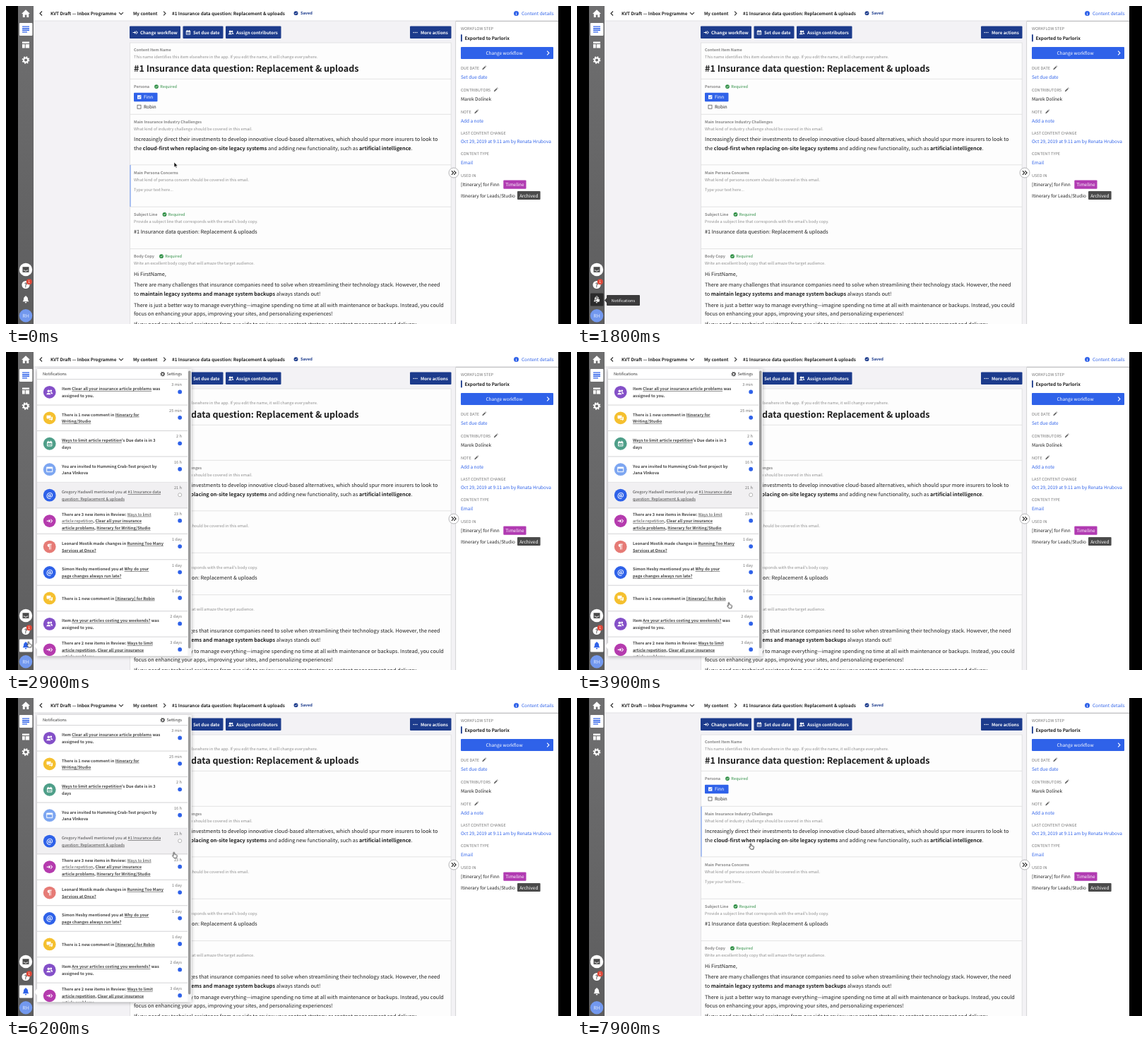
An HTML page that plays this animation: 800x450 px, repeating every 8000 ms.

```html
<!DOCTYPE html>
<html lang="en">
<head>
<meta charset="utf-8">
<title>Content editor notifications</title>
<style>
html, body { margin: 0; width: 100%; height: 100%; overflow: hidden; background: #000; }
svg { display: block; width: 100vw; height: 100vh; }
text {
  font-family: "Noto Sans CJK JP", "Noto Sans CJK SC", "Noto Sans CJK", "Noto Sans", sans-serif;
  white-space: pre; text-rendering: geometricPrecision;
}
.b { font-weight: 700; }
.r { font-weight: 400; }
.u { text-decoration: underline; }
</style>
</head>
<body>
<svg id="stage" viewBox="0 0 800 450"></svg>
<script>
const LOOP = 8000;
const BLUE = '#2f62e9', NAVY = '#1c3b8c', GREY = '#8f8f8f', INK = '#1f1f1f', GREEN = '#2f8f45';
const TITLE = '#1 Insurance data question: Replacement & uploads';

// Marks: *bold*, _bold link_, ~plain link~
const CLASSES = { '*': 'b', '_': 'b u', '~': 'r u' };
const rich = s => s.replace(/&/g, '&amp;').replace(/([*_~])(.*?)\1/g,
  (m, mark, body) => `<tspan class="${CLASSES[mark]}">${body}</tspan>`);
const text = (x, y, s, size, fill = INK, cls = '', anchor = 'start') =>
  `<text x="${x}" y="${y}" font-size="${size}" fill="${fill}" class="${cls}" text-anchor="${anchor}">${rich(s)}</text>`;
const rect = (x, y, w, h, fill, extra = '') =>
  `<rect x="${x}" y="${y}" width="${w}" height="${h}" fill="${fill}" ${extra}/>`;
const circle = (x, y, r, fill, extra = '') => `<circle cx="${x}" cy="${y}" r="${r}" fill="${fill}" ${extra}/>`;
const line = (x1, y1, x2, y2, stroke = '#dcdcde', w = 0.8) =>
  `<path d="M${x1} ${y1}L${x2} ${y2}" stroke="${stroke}" stroke-width="${w}"/>`;
const stroke = (d, w = 1) => `<path d="${d}" fill="none" stroke="currentColor" stroke-width="${w}"/>`;
const fill = d => `<path d="${d}" fill="currentColor"/>`;
const group = (id, body, extra = '') => `<g id="${id}" ${extra}>${body}</g>`;

const ICONS = {
  home: fill('M-6 .3L0-5.5 6 .3H4.2V5.2H1.3V1.6H-1.3V5.2H-4.2V.3Z'),
  lines: fill('M-5-4.6H5V-3.2H-5ZM-5-2H5V-.6H-5ZM-5 .6H5V2H-5ZM-5 3.2H2V4.6H-5Z'),
  layout: fill('M-5-4.5H5V-2H-5ZM-5-1H-1.3V4.5H-5ZM-.3-1H5V4.5H-.3Z'),
  gear: `<circle r="3" fill="none" stroke="currentColor" stroke-width="2"/>
    <circle r="4.4" fill="none" stroke="currentColor" stroke-width="2" stroke-dasharray="1.728"/>`,
  bell: fill('M-4.4 2.8C-2.8 1-3.2 0-2.9-1.7C-2.6-3.5-1.2-4.2-.7-4.4V-5.2H.7V-4.4C1.2-4.2 2.6-3.5 2.9-1.7C3.2 0 2.8 1 4.4 2.8ZM-1.3 3.6H1.3A1.3 1.4 0 0 1-1.3 3.6Z'),
  inbox: fill('M-4.5-3.8H4.5V3.8H-4.5Z') + '<path d="M-3.3 1H-1.5L-.8 2.1H.8L1.5 1H3.3" stroke="#fff" fill="none" stroke-width=".9"/>',
  flow: fill('M-4-.6H-1V-2.6L1.4 0-1 2.6V.6H-4ZM.9-2.6H2L4.4 0 2 2.6H.9L3 0Z'),
  calendar: stroke('M-3.2-2.6H3.2V3.3H-3.2ZM-1.8-4V-2M1.8-4V-2') + fill('M-3.2-2.6H3.2V-.8H-3.2ZM-1.8.4H-.4V1.7H-1.8ZM.5.4H1.9V1.7H.5Z'),
  people: `<circle cx="-1.4" cy="-1.6" r="1.8" fill="currentColor"/><circle cx="2" cy="-1.9" r="1.4" fill="currentColor"/>`
    + fill('M-4.4 3.3C-4.2 0 1.4 0 1.6 3.3ZM2.3 2.5C2.2 1.2 1.7.6 1.2.1C3 -.5 4.4 .7 4.4 2.5Z'),
  chat: fill('M-4.2-3.6H1.8V.6H-1.6L-3 2V.6H-4.2ZM2.6-1.5H4.3V2.7H3.4V4L2 2.7H-.9V1.4H2.6Z'),
  win: stroke('M-4-3.2H4V3.4H-4Z') + fill('M-4-3.2H4V-1.2H-4Z'),
  at: `<text y="3.1" font-size="9.5" fill="currentColor" class="b" text-anchor="middle">@</text>`,
  para: fill('M3-4V-3H2V4H1.1V-3H.2V4H-.7V.5C-4-.1-3.6-4-.6-4Z'),
  pencil: fill('M-3 3L-2.5 1.1 1.1-2.5 2.5-1.1-1.1 2.5ZM1.7-3L2.3-3.5 3.5-2.3 3-1.7Z'),
  check: `<circle r="2.9" fill="currentColor"/><path d="M-1.4 0L-.4 1.1 1.5-1" fill="none" stroke="#fff" stroke-width=".8"/>`,
  left: stroke('M1.5-3L-1.5 0 1.5 3', 1.2),
  right: stroke('M-1.4-2.8L1.4 0-1.4 2.8', 1.1),
  down: stroke('M-3-1.4L0 1.5 3-1.4', 1.1),
  dots: [-2.8, 0, 2.8].map(x => circle(x, 0, 0.9, 'currentColor')).join(''),
};
const icon = (name, x, y, color = '#fff', k = 1) =>
  `<g transform="translate(${x} ${y}) scale(${k})" color="${color}">${ICONS[name]}</g>`;

const railTile = (name, y, back, color) =>
  rect(19, y - 9, 18.4, 18, back, 'rx="1"') + icon(name, 28, y, color);

function rail() {
  return rect(17, 0, 22, 450, 'url(#rail)') + icon('home', 28, 10.8)
    + railTile('lines', 33, '#fff', BLUE) + icon('layout', 28, 55) + icon('gear', 28, 76.5)
    + circle(28, 373, 9.2, '#fff') + icon('inbox', 28, 373, '#4a4a4a')
    + circle(28, 394.5, 5.6, '#fff') + text(28, 397.6, '?', 8.4, '#4a4a4a', 'b', 'middle')
    + circle(32.8, 390.3, 4, '#e0493a') + text(32.8, 392.2, '1', 5.2, '#fff', '', 'middle')
    + icon('bell', 28, 415.5)
    + circle(28, 438.3, 9.2, '#7298ee') + text(28, 441, 'RH', 7, '#dbe6ff', '', 'middle');
}

function topBar() {
  return rect(39, 0, 743, 21, '#fff') + line(39, 21, 782, 21, '#dadadd')
    + icon('left', 49.5, 10.5, '#333') + text(63, 12.9, 'KVT Draft — Inbox Programme', 6.3, INK, 'b')
    + icon('down', 163, 10.5, '#333') + text(180, 12.9, 'My content', 6.3, INK, 'b')
    + icon('right', 224.5, 10.5, '#333') + text(235, 12.9, TITLE, 6.3, INK, 'b')
    + icon('check', 410.5, 10.2, NAVY) + text(417, 12.4, 'Saved', 5.67, NAVY, 'b')
    + circle(722.5, 10.5, 3.5, BLUE) + text(722.5, 12.6, 'i', 5.5, '#fff', 'b', 'middle')
    + text(730, 12.9, 'Content details', 6.45, BLUE);
}

function toolbar() {
  return [
    [175, 72, 'flow', 183, 190, 'Change workflow'],
    [250.5, 57, 'calendar', 258, 265, 'Set due date'],
    [311, 78.5, 'people', 318.5, 326, 'Assign contributors'],
    [572, 58.5, 'dots', 579.5, 587, 'More actions'],
  ].map(([x, w, ic, ix, tx, s]) => rect(x, 28.6, w, 17.4, NAVY, 'rx="1"')
    + icon(ic, ix, 37.5, '#fff', 0.85) + text(tx, 39.9, s, 6.15, '#fff', 'b')).join('');
}

const label = (y, s, hint) => text(181, y, s, 5.5, '#858585', 'b') + (hint ? text(181, y + 9.7, hint, 5.68, GREY) : '');
const required = (x, y) => icon('check', x, y - 2.2, GREEN) + text(x + 5.3, y, 'Required', 5.6, GREEN);
const para = (y, s) => text(181, y, s, 7.28);

function card() {
  return rect(175.4, 52, 454.8, 410, '#fdfdfd', 'stroke="#dcdcde" stroke-width=".8"')
    + [103.3, 153.3, 224.8, 284.2, 343.6].map(y => line(175.4, y, 630.2, y)).join('')
    + label(64.2, 'Content Item Name', 'This name identifies this item elsewhere in the app. If you edit the name, it will change everywhere.')
    + text(181, 93.1, TITLE, 12.55, INK, 'b')
    + label(116.3, 'Persona') + required(213, 116.3)
    + rect(181, 122.8, 33.5, 12.4, BLUE, 'rx="1"')
    + rect(186, 126.2, 5.4, 5.4, '#fff') + `<path d="M187.2 128.9l1.2 1.3 2-2.5" fill="none" stroke="${BLUE}" stroke-width=".8"/>`
    + text(195, 131.4, 'Finn', 6.45, '#fff')
    + rect(186, 140.2, 5, 5, '#fff', 'stroke="#444" stroke-width=".7"') + text(195, 145.3, 'Robin', 6.45)
    + label(166.2, 'Main Insurance Industry Challenges', 'What kind of industry challenge should be covered in this email.')
    + para(191.2, 'Increasingly direct their investments to develop innovative cloud-based alternatives, which should spur more insurers to look to')
    + para(203.7, 'the *cloud-first when replacing on-site legacy systems* and adding new functionality, such as *artificial intelligence*.')
    + label(237.9, 'Main Persona Concerns', 'What kind of persona concern should be covered in this email.')
    + text(181, 261.6, 'Type your text here...', 5.75, GREY)
    + label(297.1, 'Subject Line', "Provide a subject line that corresponds with the email's body copy.") + required(224.5, 297.1)
    + para(322.1, TITLE)
    + label(356.4, 'Body Copy', 'Write an excellent body copy that will amaze the target audience.') + required(220, 356.4)
    + para(381.5, 'Hi FirstName,')
    + para(397.4, 'There are many challenges that insurance companies need to solve when streamlining their technology stack. However, the need')
    + para(409.9, 'to *maintain legacy systems and manage system backups* always stands out!')
    + para(425.6, 'There is just a better way to manage everything—imagine spending no time at all with maintenance or backups. Instead, you could')
    + para(438.1, 'focus on enhancing your apps, improving your sites, and personalizing experiences!')
    + para(453.4, 'If you need any technical assistance from our side to review your content strategy or content management and delivery,');
}

function details() {
  const head = (y, s) => text(644, y, s, 5.64, '#777');
  const val = (y, s, c = BLUE) => text(644, y, s, 6.47, c);
  const tag = (x, y, w, s, c) => rect(x, y - 8.7, w, 12.2, c, 'rx="1"') + text(x + w / 2, y, s, 6.45, '#fff', '', 'middle');
  return rect(637, 21.4, 145, 429, '#fff') + line(636.6, 21.4, 636.6, 450, '#d3d3d6', 1)
    + head(34.2, 'WORKFLOW STEP') + rect(644, 40.3, 1.8, 10, NAVY) + text(649.5, 47.6, 'Exported to Parlorix', 6.45, INK, 'b')
    + rect(644, 58, 131, 17, BLUE, 'rx="1"') + text(705.5, 68.9, 'Change workflow', 6.45, '#fff', '', 'middle') + icon('right', 767.5, 66.5)
    + head(90.1, 'DUE DATE') + icon('pencil', 677, 87.5, '#666', 0.9) + val(103, 'Set due date')
    + head(120.8, 'CONTRIBUTORS') + icon('pencil', 693.5, 118.5, '#666', 0.9) + val(134.4, 'Marek Dolínek', INK)
    + head(152, 'NOTE') + icon('pencil', 666, 149.5, '#666', 0.9) + val(165, 'Add a note')
    + head(181.6, 'LAST CONTENT CHANGE') + val(194.4, 'Oct 29, 2019 at 9:11 am by Renata Hrubova')
    + head(210.5, 'CONTENT TYPE') + val(223.6, 'Email')
    + head(241.5, 'USED IN') + val(255.2, '[Itinerary] for Finn', INK) + tag(704.3, 255.2, 32.2, 'Timeline', '#b13bb2')
    + val(270.6, 'Itinerary for Leads/Studio', INK) + tag(724, 270.6, 32.6, 'Archived', '#4b4b4b')
    + circle(634, 236, 7, '#fff', 'stroke="#a4a4a8" stroke-width=".8"')
    + icon('right', 632.3, 236, '#222') + icon('right', 635.7, 236, '#222');
}

const ROWS = [
  ['people', '#8450c8', '3 min', 'Item _Clear all your insurance article problems_ was', 'assigned to you.'],
  ['chat', '#f5c02f', '25 min', 'There is 1 new comment in _Itinerary for_', '_Writing/Studio_'],
  ['calendar', '#4f9f89', '2 h', "_Ways to limit article repetition_'s Due date is in 3", 'days'],
  ['win', '#7da6f1', '16 h', 'You are invited to Humming Crab-Test project by', 'Jana Vlnkova'],
  ['at', BLUE, '21 h', 'Gregory Hadwell mentioned you at ~#1 Insurance data~', '~question: Replacement & uploads~'],
  ['flow', '#b53bae', '23 h', 'There are 3 new items in Review: ~Ways to limit~', '~article repetition~, _Clear all your insurance_', '_article problems_, _Itinerary for Writing/Studio_'],
  ['para', '#e67b76', '1 day', 'Leonard Mostik made changes in _Running Too Many_', '_Services at Once?_'],
  ['at', BLUE, '1 day', 'Simon Hesby mentioned you at _Why do your_', '_page changes always run late?_'],
  ['chat', '#f5c02f', '1 day', 'There is 1 new comment in _[Itinerary] for Robin_'],
  ['people', '#8450c8', '2 days', 'Item _Are your articles costing you weekends?_ was', 'assigned to you.'],
  ['flow', '#b53bae', '3 days', 'There are 2 new items in Review: _Ways to limit_', '_article repetition_, _Clear all your insurance_', '_article problems_'],
];
const ROW_H = 36.45, READ = 4;

function row([ic, color, when, ...lines], i) {
  const top = 38.6 + i * ROW_H, mid = top + ROW_H / 2, read = i === READ;
  return (read ? rect(44, top, 213, ROW_H, '#f1f0f2') : '')
    + line(44, top + ROW_H, 257, top + ROW_H, '#c8c8cb')
    + circle(61.7, mid, 8.9, color) + icon(ic, 61.7, mid)
    + lines.map((s, n) => text(79, mid + 2.2 + (n - (lines.length - 1) / 2) * 9.6, s, 5.7, '#444', read ? '' : 'b')).join('')
    + text(249, top + 9.8, when, 5.7, '#777', '', 'end')
    + circle(246.2, top + 17.8, read ? 2.5 : 2.9, read ? '#fff' : BLUE, read ? 'stroke="#999" stroke-width=".7"' : '');
}

function panel() {
  return railTile('bell', 415.5, '#fff', BLUE)
    + rect(44, 24, 218.6, 406.3, '#fff', 'style="filter:drop-shadow(0 1px 2.5px rgba(0,0,0,.32))"')
    + '<path d="M44 411.5L39.8 416 44 420.5Z" fill="#fff"/>'
    + `<g clip-path="url(#list)">${ROWS.map(row).join('')}</g>`
    + text(52, 33.4, 'Notifications', 5.68, '#333')
    + icon('gear', 221.8, 31.3, '#444', 0.62) + text(249, 33.4, 'Settings', 5.7, '#333', '', 'end')
    + line(44, 38.6, 257, 38.6, '#c8c8cb')
    + rect(257.2, 24, 5.4, 406.3, '#f4f4f5') + rect(258, 26.5, 3.5, 393, '#9c9c9c', 'rx="1.7"');
}

const arrow = '<path d="M0 0V7.2L1.7 5.7 2.8 8.3 4 7.8 2.9 5.2H5.1Z" fill="#111" stroke="#fff" stroke-width=".6"/>';
const hand = '<path d="M-.8.7C-.8-.3.7-.3.8.7L1 3.2C1.6 2.8 2.1 2.9 2.3 3.4C2.9 3.1 3.4 3.3 3.5 3.9C4.2 3.7 4.5 4.1 4.4 4.9L3.8 8.1H.2L-2.2 5.2C-2.5 4.4-1.6 4.1-.8 4.9Z" fill="#fff" stroke="#222" stroke-width=".8"/>';

const stage = document.getElementById('stage');
stage.innerHTML = `<defs>
    <linearGradient id="rail" x2="0" y2="1"><stop stop-color="#6f6f70"/><stop offset="1" stop-color="#5d5d5e"/></linearGradient>
    <clipPath id="list"><rect x="44" y="24" width="218" height="406.3"/></clipPath>
  </defs>`
  + rect(0, 0, 800, 450, '#000') + rect(39, 21, 598, 429, '#f3f2f5')
  + card()
  + group('hoverLow', line(176, 225, 176, 284, '#6f97ee', 1.1))
  + group('hoverHigh', line(176, 153.5, 176, 224.6, '#6f97ee', 1.1))
  + toolbar() + topBar() + details() + rail()
  + group('tile', railTile('bell', 415.5, '#2a2a2b', '#fff'))
  + group('tip', rect(42, 409, 47, 15, '#3b3b3c', 'rx="1"') + '<path d="M42 413L39 416.5 42 420Z" fill="#3b3b3c"/>'
    + text(65.5, 418.7, 'Notifications', 5.6, '#fff', '', 'middle'))
  + group('panel', panel())
  + group('cursor', group('arrow', arrow) + group('hand', hand))
  + rect(0, 0, 17, 450, '#000') + rect(782, 0, 18, 450, '#000');

const start = document.timeline.currentTime || 0;
const play = (id, frames) => {
  const a = document.getElementById(id).animate(frames, { duration: LOOP, iterations: Infinity });
  a.startTime = start;
};

// Each part is visible during its [from, to) spans.
const SHOWN = {
  hoverLow: [[0, 200]],
  hoverHigh: [[200, 900], [7800, LOOP]],
  tile: [[1500, 2800]],
  tip: [[1700, 2800]],
  panel: [[2800, 7800]],
  arrow: [[0, 1500]],
  hand: [[1500, LOOP]],
};
for (const [id, spans] of Object.entries(SHOWN)) {
  const times = [...new Set([0, LOOP, ...spans.flat()])].sort((a, b) => a - b);
  play(id, times.map(t => ({
    offset: t / LOOP,
    opacity: spans.some(([a, b]) => t >= a && t < b) ? 1 : 0,
    easing: 'step-end',
  })));
}

// Pointer tip: time, x, y
const PATH = [
  [0, 238, 221], [100, 238, 221], [200, 221, 212], [600, 221, 212], [700, 207, 232], [800, 207, 232],
  [1100, 55, 384.5], [1300, 55, 384.5], [1500, 28, 428], [1600, 28, 428], [1700, 28, 411],
  [2800, 28, 411], [3800, 215, 354.5], [4500, 215, 354.5], [6100, 237.8, 218.3],
  [6900, 237.8, 218.3], [7500, 246, 206], [LOOP, 246, 206],
];
play('cursor', PATH.map(([t, x, y]) => ({
  offset: t / LOOP, transform: `translate(${x}px, ${y}px)`, easing: 'ease-in-out',
})));
</script>
</body>
</html>
```
